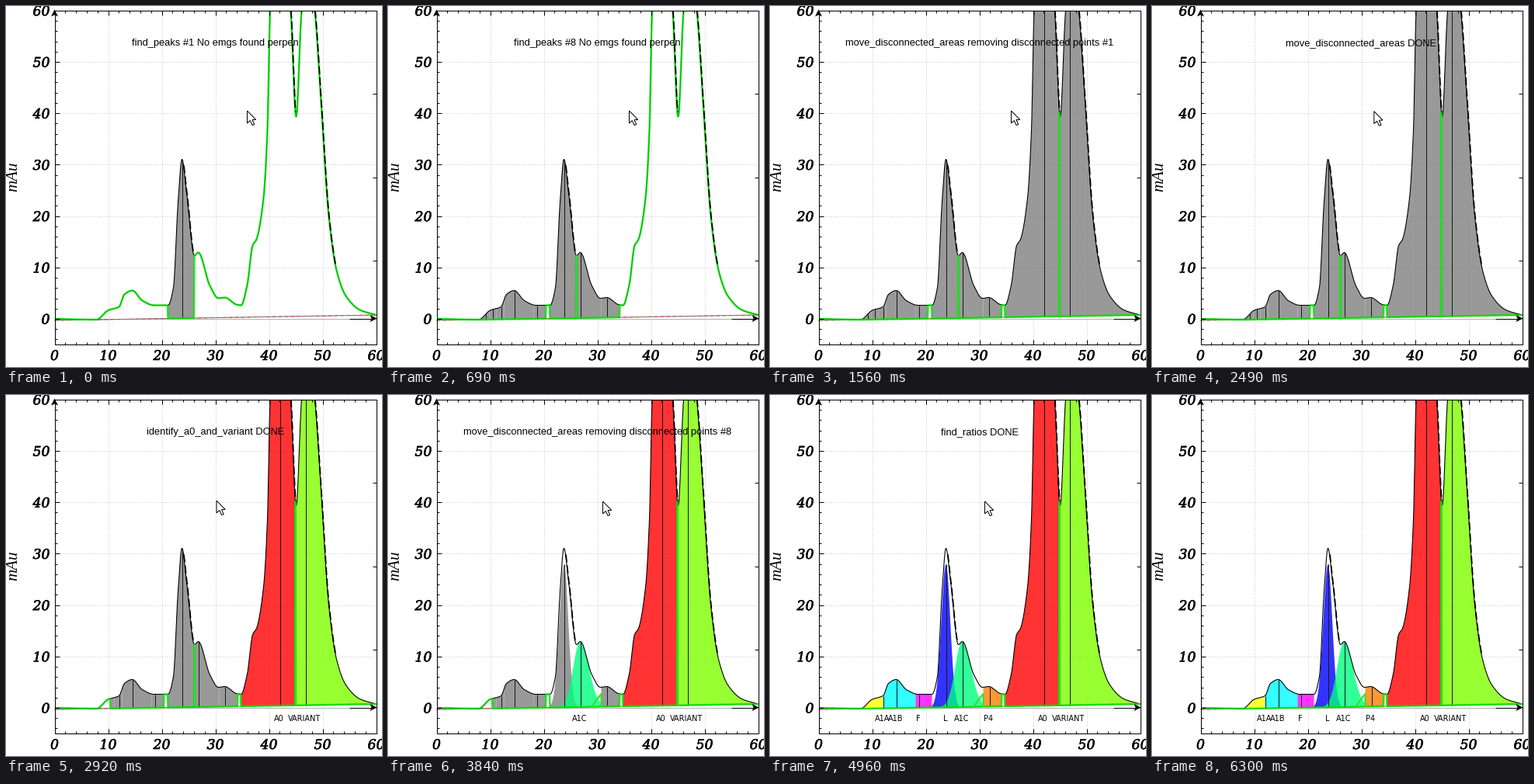
Write a matplotlib script that moves like this. It is 484 by 465 pixels and loops after 7.32 s.

```python
import numpy as np
import matplotlib.pyplot as plt
from matplotlib import patheffects
from matplotlib.animation import FuncAnimation
from matplotlib.patches import Polygon, Rectangle

W, H, DPI = 484, 465, 64
LOOP, STEP = 7320, 20
PX = 72 / DPI                      # points per pixel
LEFT, RIGHT, TOP, BOTTOM = 62, 476, 5, 435
X = np.arange(LEFT, RIGHT + 0.5, 0.5)

fig = plt.figure(figsize=(W / DPI, H / DPI), dpi=DPI, facecolor="white")
ax = fig.add_axes([0, 0, 1, 1])
ax.set(xlim=(-0.5, W - 0.5), ylim=(H - 0.5, -0.5))
ax.axis("off")
window = Rectangle((LEFT, TOP), RIGHT - LEFT, BOTTOM - TOP, fc="none", ec="none")
ax.add_patch(window)


def x_pix(value):
    return LEFT + 6.9 * value


def y_pix(value):
    return 402.5 - 6.62 * value


def monotone(points):
    """Monotone cubic interpolation of the points over X."""
    px, py = np.array(points, float).T
    h = np.diff(px)
    d = np.diff(py) / h
    m = np.concatenate([d[:1], np.zeros(len(d) - 1), d[-1:]])
    same = np.flatnonzero(d[:-1] * d[1:] > 0)
    m[same + 1] = 2 * d[same] * d[same + 1] / (d[same] + d[same + 1])
    i = np.clip(np.searchsorted(px, X) - 1, 0, len(h) - 1)
    u = (X - px[i]) / h[i]
    return (py[i] * (1 + 2 * u) * (1 - u) ** 2 + py[i + 1] * u ** 2 * (3 - 2 * u)
            + h[i] * u * (1 - u) * (m[i] * (1 - u) - m[i + 1] * u))


def line(xs, ys, color="black", width=1, z=1, **kw):
    art, = ax.plot(xs, ys, color=color, lw=width * PX, zorder=z,
                   solid_capstyle="butt", dash_capstyle="butt", **kw)
    return art


def clipped(art):
    art.set_clip_path(window)
    return art


minor = [(LEFT, 402.5), (116, 403.5), (131, 391.5), (145, 387), (152, 371),
         (162, 366), (175, 379), (190, 385), (208, 385), (215, 362), (221, 252),
         (226, 197), (232, 240), (242, 321), (247, 317), (262, 360), (273, 376),
         (281, 375), (296, 384)]
major = [(302, 385), (310, 359), (317, 308), (322, 300), (331, 247), (336, 160),
         (339.5, TOP), (352, -160), (366, TOP), (373, 142), (380, TOP), (388, -60),
         (397, TOP), (405, 122), (415, 270), (425, 340), (437, 373), (455, 391),
         (RIGHT, 397.5)]
curve = monotone(minor + major)
base = np.linspace(404.5, 397.5, len(X))


def bell(center, height, left_sigma, right_sigma):
    sigma = np.where(X < center, left_sigma, right_sigma)
    top = base - height * np.exp(-((X - center) / sigma) ** 2 / 2)
    return np.maximum(curve, top)


labile = bell(226, 184, 6, 5.6)
a1c = bell(247, 85, 9, 11)

# Chart furniture
for v in range(10, 60, 10):
    for xs, ys in (([x_pix(v)] * 2, [TOP, BOTTOM]), ([LEFT, RIGHT], [y_pix(v)] * 2)):
        line(xs, ys, "#c4c4c4", 1, 0.5, ls=(0, (1, 2)))
line([LEFT, RIGHT], [402, 402], "#b0b0b0", 1, 0.6)
line(X, base, "#d05050", 1, 0.8)
line(X, base, "#707070", 1, 0.8, ls=(0, (5, 3)))

for v in range(-4, 61, 2):
    size = 3 if v % 10 else 6
    line([LEFT, LEFT + size], [y_pix(v)] * 2, z=6)
    if v >= 0:
        line([x_pix(v)] * 2, [BOTTOM, BOTTOM - size], z=6)
        line([x_pix(v)] * 2, [TOP, TOP + size], z=6)
for y in np.linspace(TOP, BOTTOM, 5):
    line([RIGHT - 5, RIGHT], [y, y], z=6)
line([LEFT, RIGHT, RIGHT, LEFT, LEFT], [TOP, TOP, BOTTOM, BOTTOM, TOP], z=6)
line([441, 472], [402, 402], z=6)
head = np.array([(0, 0), (-4.5, 9), (0, 7), (4.5, 9)])
for tip in (head + [LEFT, 4], head[:, ::-1] * [-1, 1] + [477, 402]):
    ax.add_patch(Polygon(tip, fc="black", ec="none", zorder=7))

number = dict(family="DejaVu Serif", style="italic", size=17.3 * PX, va="center_baseline",
              path_effects=[patheffects.withStroke(linewidth=0.7, foreground="black")])
for v in range(0, 61, 10):
    ax.text(x_pix(v), 449, str(v), ha="center", **number)
    ax.text(56, y_pix(v), str(v), ha="right", **number)
ax.text(9, 219, "mAu", family="Liberation Serif", style="italic",
        size=21 * PX, rotation=90, ha="center", va="center")

# Signal, with heavier dashes on the falling flanks
clipped(line(X, curve, "black", 1.1, 3))
for lo, hi in ((228, 241), (366, 372), (397, 424)):
    part = (X >= lo) & (X <= hi)
    clipped(line(X[part] + 0.4, curve[part], "black", 1.7, 5, ls=(0, (6, 2.5))))
green = clipped(line(X, curve, "#00e400", 2.5, 4, alpha=0.82))
residue = line([262, 268, 274, 274], [401, 392, 384.5, 401], "#30e430", 2.2, 4)

# Areas in order of detection: apex, left, right, hidden at
found_at = [0, *np.linspace(80, 770, 8), 920]
FOUND = [
    (226, 208, 241.5, 3060), (247, 242.5, 274, 3060), (162, 149, 187, 4220),
    (281, 274, 297.5, 4810), (191, 187, 202.5, 4350), (145, 139, 149, 4220),
    (134, 130, 139, 2540), (125, 118, 130, 2540), (352, 302, 371.5, 2690),
    (385, 372.5, RIGHT, 2690),
]
# Named areas: shown from, apex, left, right, colour, label, top outline
NAMED = [
    (2690, 352, 302, 371.5, "red", "A0", curve),
    (2690, 385, 372.5, RIGHT, "chartreuse", "VARIANT", curve),
    (4580, 226, 208, 242, "blue", "L", labile),
    (3060, 247, 209, 274, "springgreen", "A1C", a1c),
    (4220, 145, 118, 145, "yellow", "A1A", curve),
    (4220, 162, 145, 187, "cyan", "A1B", curve),
    (4350, 191, 187, 208, "magenta", "F", curve),
    (4810, 282, 274, 297.5, "#ff8000", "P4", curve),
]
areas = []


def add_area(start, end, apex, lo, hi, color="gray", label="", top=curve):
    part = (X >= lo) & (X <= hi)
    outline = np.r_[np.c_[X, top][part], np.c_[X, base][part][::-1]]
    patch = Polygon(outline, fc=color, ec="none", alpha=0.8, zorder=2)
    ax.add_patch(patch)
    parts = [clipped(patch)]
    if lo <= apex <= hi:
        k = np.searchsorted(X, apex)
        parts.append(clipped(line([apex] * 2, [top[k], base[k]], "#181818", 1, 2.5)))
    if label:
        parts.append(ax.text(apex - 1, 419.5, label, family="DejaVu Sans",
                             size=9.8 * PX, ha="center", va="baseline", zorder=8))
    areas.append((start, end, part, parts))


for start, (apex, lo, hi, end) in zip(found_at, FOUND):
    add_area(start, end, apex, lo, hi)
add_area(2540, 4070, 145, 134, 139)
add_area(4070, 4220, 145, 118, 139)
add_area(3060, 4580, 226, 208, 242, top=labile)
for start, *shape in NAMED:
    add_area(start, LOOP, *shape)

# Status line
MOVE = "move_disconnected_areas"
POINTS = MOVE + " removing disconnected points #%d"
first_pass = [1560, *np.linspace(1690, 1990, 4), *range(2120, 2320, 47)]
second_pass = [3230, 3330, *np.linspace(3430, 3840, 6)]


def counted(times, pattern):
    return [(t, pattern % n) for n, t in enumerate(times, 1)]


MESSAGES = (
    counted(found_at, "find_peaks #%d No emgs found perpen")
    + [(1050, "find_peaks DONE"), (1330, MOVE)]
    + counted(first_pass, POINTS)
    + [(2350, MOVE + " DONE"), (2540, "remove_small_peaks DONE"),
       (2690, "identify_a0_and_variant"), (2920, "identify_a0_and_variant DONE"),
       (2970, "identify_a1c"), (3060, "identify_a1c DONE")]
    + counted(second_pass, POINTS)
    + [(3920, MOVE + " DONE"), (4070, "identify_a1a_and_a1b"),
       (4220, "identify_a1a_a1b DONE"), (4350, "identify_f DONE"),
       (4580, "identify_labile_a1c DONE"), (4810, "identify_p4_peak DONE"),
       (4960, "find_ratios DONE"), (5100, "")])
status = ax.text(269, 51, "", family="Liberation Sans", size=12.85 * PX,
                 ha="center", va="baseline", zorder=9)

# Mouse pointer: time, x, y of its stops
ARROW = np.array([(0, 0), (0, 16), (3.8, 12.6), (6.6, 18.6), (9.2, 17.5),
                  (6.5, 11.6), (11.2, 11.4)])
STOPS = np.array([(2300, 310, 134.5), (2540, 270.5, 135.5), (2970, 270.5, 135.5),
                  (3240, 276, 136.5), (5920, 276, 136.5), (6250, 345, 406)]).T
pointer = Polygon(ARROW, fc="white", ec="black", lw=PX, joinstyle="miter", zorder=10)
ax.add_patch(pointer)


def update(n):
    t = n * STEP
    taken = np.zeros(len(X), bool)
    for start, end, part, parts in areas:
        shown = start <= t < end
        for art in parts:
            art.set_visible(shown)
        if shown:
            taken |= part
    green.set_ydata(np.where(taken, base, curve))
    residue.set_visible(t >= 3060)
    status.set_text([text for start, text in MESSAGES if start <= t][-1])
    tick = t // 50 * 50
    pointer.set_xy(ARROW + [np.interp(tick, STOPS[0], axis) for axis in STOPS[1:]])
    pointer.set_visible(t < 6300)
    return []


anim = FuncAnimation(fig, update, frames=LOOP // STEP, interval=STEP,
                     repeat=True, repeat_delay=0, blit=False)
plt.show()
```
